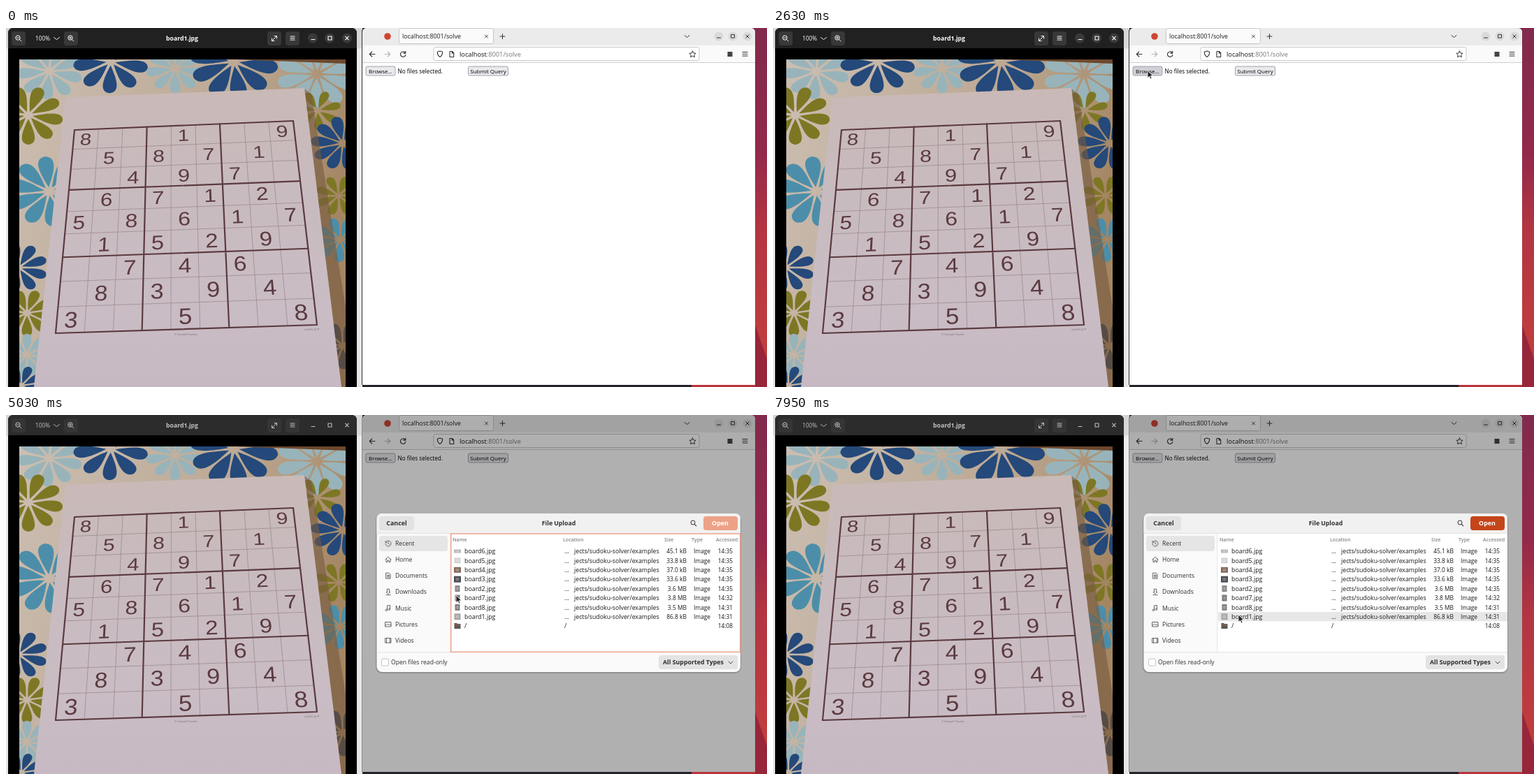
Recreate the animation shown at these times as an HTML page. Size 1089x514 px, loop 8 s.

```html
<!DOCTYPE html>
<html lang="en">
<head>
<meta charset="utf-8">
<title>Sudoku upload</title>
<style>
html, body { margin: 0; width: 100%; height: 100%; overflow: hidden; background: #000; }
svg { display: block; width: 100vw; height: 100vh; }
text { font-family: "Open Sans", "Noto Sans", sans-serif; white-space: pre; }
.digit { font-family: "Liberation Sans", Arial, sans-serif; }
</style>
</head>
<body>
<svg id="stage" viewBox="0 0 1089 514" xmlns="http://www.w3.org/2000/svg"></svg>
<script>
const LOOP = 8000;

// Markup helpers
const rect = (x, y, w, h, fill, extra = '') =>
  `<rect x="${x}" y="${y}" width="${w}" height="${h}" fill="${fill}" ${extra}/>`;
const circle = (x, y, r, fill, extra = '') =>
  `<circle cx="${x}" cy="${y}" r="${r}" fill="${fill}" ${extra}/>`;
const poly = (pts, fill, extra = '') => `<polygon points="${pts}" fill="${fill}" ${extra}/>`;
const line = (d, color = '#333', w = 1.1, extra = '') =>
  `<path d="${d}" fill="none" stroke="${color}" stroke-width="${w}" stroke-linecap="round" stroke-linejoin="round" ${extra}/>`;
const text = (s, x, y, size, fill = '#222', extra = '') =>
  `<text x="${x}" y="${y}" font-size="${size}" fill="${fill}" ${extra}>${s}</text>`;
const BOLD = 'font-weight="700"', MID = 'text-anchor="middle"', END = 'text-anchor="end"';
const gradient = (id, stops, dir = 'x2="0" y2="1"') =>
  `<linearGradient id="${id}" ${dir}>` +
  stops.map(([o, c]) => `<stop offset="${o}" stop-color="${c}"/>`).join('') + '</linearGradient>';

// Maps the unit square onto four corners in perspective
function projector([x0, y0], [x1, y1], [x2, y2], [x3, y3]) {
  const ax = x1 - x2, ay = y1 - y2, bx = x3 - x2, by = y3 - y2;
  const sx = x0 - x1 + x2 - x3, sy = y0 - y1 + y2 - y3, det = ax * by - bx * ay;
  const g = (sx * by - bx * sy) / det, h = (ax * sy - sx * ay) / det;
  return (u, v) => {
    const w = g * u + h * v + 1;
    return [((x1 - x0 + g * x1) * u + (x3 - x0 + h * x3) * v + x0) / w,
            ((y1 - y0 + g * y1) * u + (y3 - y0 + h * y3) * v + y0) / w].map(n => +n.toFixed(2));
  };
}

function flower(x, y, r, n, color, turn = 0) {
  const petal = `M${r * .12} 0C${r * .45} ${-r * .13} ${r * .95} ${-r * .34} ${r} 0C${r * .95} ${r * .34} ${r * .45} ${r * .13} ${r * .12} 0`;
  let s = `<g transform="translate(${x} ${y}) scale(1 .84)" fill="${color}">`;
  for (let i = 0; i < n; i++) s += `<path transform="rotate(${turn + i * 360 / n})" d="${petal}"/>`;
  return s + '</g>';
}

function sudoku() {
  const at = projector([98, 146], [411, 133], [445, 425], [71, 437]);
  const ink = '#5b3a40';
  let s = '';
  for (const thick of [false, true])
    for (let i = 0; i <= 9; i++) {
      if ((i % 3 === 0) !== thick) continue;
      const k = i / 9;
      s += line(`M${at(k, 0)}L${at(k, 1)}M${at(0, k)}L${at(1, k)}`, thick ? ink : '#9c8b90', thick ? 2.2 : .8);
    }
  const rows = ['8...1...9', '.5.8.7.1.', '..4.9.7..', '.6.7.1.2.', '5.8.6.1.7',
                '.1.5.2.9.', '..7.4.6..', '.8.3.9.4.', '3...5...8'];
  rows.forEach((row, r) => [...row].forEach((d, c) => {
    if (d === '.') return;
    // Each digit lies in the plane of its cell
    const p = (u, v) => at((c + u) / 9, (r + v) / 9);
    const [x, y] = p(.5, .5), west = p(0, .5), east = p(1, .5), north = p(.5, 0), south = p(.5, 1);
    const axis = (a, b) => `${(b[0] - a[0]) / 100} ${(b[1] - a[1]) / 100}`;
    s += text(d, 0, 31, 85, ink, `class="digit" ${MID} transform="matrix(${axis(west, east)} ${axis(north, south)} ${x} ${y})"`);
  }));
  return s + text('© Sample Puzzles', 241, 439.5, 4, '#7c6a74') +
    text('sudoku grid', 427, 433, 3.8, '#7c6a74', 'transform="rotate(-2 427 433)"');
}

function photo() {
  const blue = '#24497a', teal = '#4c8ea9', pale = '#98b4ba', olive = '#7d7724';
  return '<g clip-path="url(#photoClip)">' +
    rect(19, 45, 467, 469, 'url(#cloth)') +
    flower(62, 62, 48, 9, pale, 15) + flower(242, 58, 42, 9, pale, 10) +
    flower(445, 66, 58, 10, pale, 20) +
    flower(150, 48, 54, 9, blue, 12) + flower(326, 48, 64, 10, blue, 10) +
    flower(32, 125, 50, 9, olive, 10) + flower(446, 118, 34, 7, olive, 35) +
    flower(482, 165, 46, 10, blue, 5) +
    flower(62, 234, 60, 10, teal, 12) +
    flower(18, 343, 42, 9, blue, 20) +
    flower(30, 408, 40, 9, olive, 10) + flower(30, 468, 36, 9, pale, 30) +
    flower(22, 512, 34, 9, blue, 10) +
    flower(476, 240, 34, 8, olive, 20) + flower(478, 303, 38, 9, teal, 12) +
    flower(482, 455, 40, 9, '#26384f', 8) +
    poly('330,45 486,45 486,51', '#6d482d') +
    poly('427,87 437,95 486,400 486,514 480,514', '#775a40', 'opacity=".6"') +
    poly('85,99.500 427,86 480,514 40,514', 'url(#paper)') +
    sudoku() + '</g>';
}

function viewer() {
  const ctl = [439, 463, 488];
  return rect(0, 0, 510, 514, 'url(#gap)') +
    '<path d="M3 514V8Q3 0 11 0H494Q502 0 502 8V514Z" fill="#000"/>' +
    '<path id="head" d="M3 29V8Q3 0 11 0H494Q502 0 502 8V29Z"/>' +
    '<g id="pills">' + [8, 83, 374, 400].map(x => rect(x, 5, 20, 20, '#fff', 'rx="4"')).join('') + '</g>' +
    '<g id="rounds">' + ctl.map(x => circle(x, 14.5, 7, '#393939')).join('') + '</g>' +
    '<g id="headText">' +
    text('100%', 42, 17.8, 8.3, '#fff') + text('board1.jpg', 252, 17.6, 8.7, '#fff', `${BOLD} ${MID}`) +
    [17.5, 92.5].map((x, i) => circle(x - .5, 14, 3.2, 'none', 'stroke="#fff"') +
      line(`M${x + 2} 16.500l2.500 2.500M${x - 2} 14h3${i ? `M${x - .5} 12.500v3` : ''}`, '#fff', .9)).join('') +
    line('M68.500 13.500l4 3 4-3', '#fff', .9) +
    line('M381 18l6-6M384 11.500h3.500v3.500M380.500 15v3.500h3.500', '#fff', 1) +
    line('M407 12h6M407 14.500h6M407 17h6', '#fff', 1.1) +
    line('M437 16.500h5M461 12h5v5h-5zM485.700 12.200l4.600 4.600M490.300 12.200l-4.600 4.600', '#fff', 1.1) +
    '</g>' + photo();
}

function button(x, w, label, id = '') {
  return rect(x, 55, w, 13, '#e9e9ed', `rx="2" stroke="#8f8f9d" stroke-width=".8" ${id}`) +
    text(label, x + w / 2, 64.6, 8, '#000', MID);
}

function browser() {
  const ctl = [1020, 1040, 1061];
  return '<g clip-path="url(#winClip)">' +
    rect(510, 0, 562, 511, '#fff') + rect(510, 0, 562, 25, '#ebebeb') +
    rect(562.5, .5, 135, 22, '#fbfbfb', 'rx="3" stroke="#bcbcbc" stroke-width=".8"') +
    rect(510, 25, 562, 24.5, '#fafafa') + rect(510, 49, 562, 1, '#cfcfcf') +
    circle(546, 12, 4.8, '#cf4433') +
    text('localhost:8001/solve', 567, 15, 8.85, '#1c1c1c') +
    line('M685.500 10l4 4M689.500 10l-4 4', '#333', .9) +
    line('M707 12h7M710.500 8.500v7', '#333', 1) + line('M971 10.500l3.500 3 3.500-3', '#333', 1) +
    ctl.map(x => circle(x, 12, 6.5, '#dadada')).join('') +
    line('M1017.500 14h5M1038 9.500h4.500v4.500h-4.500zM1058.800 9.800l4.400 4.400M1063.200 9.800l-4.400 4.400', '#333', 1) +
    line('M528 37.500h-7.500M523.800 34l-3.500 3.500 3.500 3.500') +
    line('M542 37.500h7.500M546.200 34l3.500 3.500-3.500 3.500', '#b5b5b5') +
    line('M571 35.200a3.700 3.700 0 1 0 .8 3.300M571.800 33.200v2.900h-2.900') +
    rect(612, 27.5, 380, 19, '#fff', 'rx="2.500" stroke="#bdbdbd" stroke-width=".8"') +
    line('M621 33l3.700 1.300q0 5-3.700 7.200q-3.700-2.200-3.700-7.200z') +
    line('M635 33.500h3.500l2.200 2.200v5.800h-5.700zM638.300 33.500v2.400h2.400') +
    text('localhost<tspan fill="#777">:8001/solve</tspan>', 649, 40.6, 9.25, '#111') +
    line('M982.500 33l1.400 2.900 3.200.4-2.300 2.200.6 3.200-2.900-1.600-2.900 1.600.6-3.200-2.300-2.200 3.200-.4z', '#333', 1) +
    rect(1032.5, 34, 7, 7, '#444') +
    line('M1054 34.500h7M1054 37.200h7M1054 40h7', '#333', 1.1) +
    button(515, 42, 'Browse…', 'id="browse"') +
    text('No files selected.', 560.5, 64.6, 8.2, '#000') + button(661.5, 57, 'Submit Query') +
    rect(510, 0, 562, 511, '#000', 'id="dim" fill-opacity=".310"') + '</g>';
}

const PLACES = ['Recent', 'Home', 'Documents', 'Downloads', 'Music', 'Pictures', 'Videos'];
const ICONS = [
  'M-4 0a4 4 0 1 0 1-2.600M-4-3.500v2h2M0-2v2.200l1.500 1', 'M-4 0l4-4 4 4M-3-1v4.500h2v-2.500h2v2.500h2v-4.500',
  'M-3-4h4l2 2v6h-6zM-1.500-1h3M-1.500.500h3M-1.500 2h3', 'M-1.500-4h3v4h1.500l-3 3-3-3h1.500zM-3 4.300h6',
  'M-1.500 3v-6.500l4-.500v6M-1.500 3a1.300 1.300 0 1 1-.1-.5M2.500 2a1.300 1.300 0 1 1-.1-.5',
  'M-4-3h8v6.500h-8zM-4 2l2.500-2.500 2 2 1.500-1.500 2 2', 'M-4-3h8v6.500h-8zM-2.500-3v6.500M2.500-3v6.500'];
const FILES = [
  [6, '45.1 kB', '14:35', 10, 5, '#b9b9b9'], [5, '33.8 kB', '14:35', 9, 8, '#d3d3d3'],
  [4, '37.0 kB', '14:35', 10, 8, '#84685a'], [3, '33.6 kB', '14:35', 10, 9, '#4a4d55'],
  [2, '3.6 MB', '14:35', 7, 9, '#858585'], [7, '3.8 MB', '14:32', 7, 9, '#777'],
  [8, '3.5 MB', '14:31', 7, 9, '#7e7e7e'], [1, '86.8 kB', '14:31', 9, 9, '#aaa5a3']];

function dialog() {
  const dark = '#2e2e2e', black = '#1a1a1a';
  let s = '<g id="dialog">' +
    rect(529, 141, 523, 229, '#000', 'rx="9" opacity=".180"') +
    rect(530.5, 141, 520.5, 227, '#fafafa', 'rx="8"') +
    '<path d="M530.500 169V149q0-8 8-8H1043q8 0 8 8V169Z" fill="#f1f1f1"/>' +
    rect(534, 145, 50, 20, '#e2e2e2', 'rx="4"') + text('Cancel', 559, 158, 8.9, dark, `${BOLD} ${MID}`) +
    text('File Upload', 791, 158, 8.7, dark, `${BOLD} ${MID}`) +
    circle(983, 154, 3, 'none', 'stroke="#333"') + line('M985.300 156.300l2.500 2.500') +
    rect(998, 145, 49, 20, '#eda288', 'rx="4" id="open"') +
    text('Open', 1022, 158, 8.9, '#fff', `${BOLD} ${MID}`) +
    rect(534, 173, 98, 22, '#e5e5e5', 'rx="4"');
  PLACES.forEach((name, i) => {
    const y = 184 + i * 23.1;
    s += text(name, 557, y + 3.1, 8.6, dark) +
      line(ICONS[i], '#555', .9, `transform="translate(547 ${y})"`);
  });
  s += rect(636, 169.5, 415, 170, '#fff') + rect(530.5, 169, 520.5, .8, '#dedede') +
    rect(530.5, 339.5, 520.5, .8, '#dedede') + rect(635.5, 169, .8, 171, '#dedede');
  [['Name', 639], ['Location', 797], ['Size', 942], ['Type', 981], ['Accessed', 1016]].forEach(([h, x]) =>
    s += text(h, x, 181, 7.1, '#858585', 'font-weight="600"'));
  s += rect(637, 282, 414, 13.3, '#e7e7e7', 'id="row"');
  FILES.forEach(([n, size, time, w, h, color], i) => {
    const y = 195 + i * 13.4, base = y + 3.1;
    s += rect(646 - w / 2, y - h / 2, w, h, color) +
      rect(646 - w / 4, y - h / 4, w / 2, h / 2, '#fff', 'opacity=".250"') +
      text(`board${n}.jpg`, 656, base, 8.85, black) +
      text('…', 799, base, 8.8, black) + text('jects/sudoku-solver/examples', 813, base, 8.78, black) +
      text(size, 974, base, 8.45, black, END) + text('Image', 984, base, 8.4, black) +
      text(time, 1040, base, 8.3, black, END);
  });
  return s + '<path d="M641.500 298h3.500l1 1h4.500v7h-9z" fill="#5b5754"/>' + rect(642, 300, 8, .8, '#b06a50') +
    text('/', 656, 305.3, 8.8, black) + text('/', 799, 305.3, 8.8, black) +
    text('14:08', 1040, 305.3, 8.3, black, END) +
    rect(636.8, 170, 413.8, 169.2, 'none', 'id="focus" stroke="#f2a78f" stroke-width="1.500"') +
    rect(632, 174, 2, 118, '#999', 'rx="1" id="bar"') +
    rect(537.5, 349, 10, 10, '#fff', 'rx="2" stroke="#c3c3c3"') +
    text('Open files read-only', 551, 357.2, 8.6, dark) +
    rect(934, 344, 113, 20, '#e3e3e3', 'rx="4"') +
    text('All Supported Types', 940, 357.2, 8.8, dark, BOLD) +
    line('M1034 353l3 3 3-3', '#444', 1) + '</g>';
}

const stage = document.getElementById('stage');
stage.innerHTML = '<defs>' +
  gradient('cloth', [[0, '#cbbeb2'], [.6, '#bda994'], [1, '#a48663']], 'x2="1" y2=".350"') +
  gradient('paper', [[0, '#c9b9b7'], [.35, '#c8bbbf'], [.75, '#c9bcc4'], [1, '#c7b9c3']]) +
  gradient('gap', [[0, '#d5d5d5'], [.055, '#d9d9d9'], [.06, '#ececec'], [1, '#e6e6e6']]) +
  gradient('wall', [[0, '#812a4d'], [.35, '#93294a'], [.55, '#b23542'], [1, '#c5403c']]) +
  '<clipPath id="photoClip"><rect x="19" y="45" width="467" height="469"/></clipPath>' +
  '<clipPath id="winClip"><path d="M510 511V7q0-7 7-7H1065q7 0 7 7V511Z"/></clipPath></defs>' +
  rect(0, 0, 1089, 514, '#25222c') + rect(1060, 0, 29, 514, 'url(#wall)') +
  poly('1072,425 1089,474 1089,514 1072,514', '#97263a') + rect(981, 511, 91, 3, '#b8343a') +
  viewer() + rect(509, 3, 1.2, 508, '#333', 'id="edge"') + browser() + dialog() +
  circle(0, 0, 9, '#777', 'id="press" fill-opacity=".280"') +
  '<path id="cursor" d="M0 0V10.500L2.500 8.300L4.200 12L6 11.200L4.400 7.600H7.800Z" fill="#222" stroke="#fff" stroke-width=".8" stroke-linejoin="round"/>';

const el = {};
for (const id of ['head', 'pills', 'rounds', 'headText', 'edge', 'browse', 'dim', 'dialog', 'open', 'row', 'focus', 'bar', 'press', 'cursor'])
  el[id] = document.getElementById(id);
const set = (id, name, value) => el[id].setAttribute(name, value);
const show = (id, on) => set(id, 'opacity', +on);
const mix = (a, b, k) => `rgb(${a.map((v, i) => Math.round(v + (b[i] - v) * k))})`;

// start, end, steps, from x y, to x y, ease-out powers in x and y
const MOVES = [
  [920, 1330, 7, 1124.6, 605, 628, 137, 2, 2],
  [1610, 2230, 10, 628, 137, 536, 61, 2.65, 3.35],
  [4640, 5380, 12, 536, 61, 663, 280, 2.17, 2.63],
  [5450, 5730, 5, 663, 280, 666, 286, 1, 1]];

function pointer(t) {
  const move = MOVES.filter(m => t >= m[0]).pop();
  if (!move) return [-50, -50];
  const [t0, t1, n, x0, y0, x1, y1, px, py] = move;
  const step = Math.min(n, 1 + Math.floor((t - t0) / (t1 - t0) * (n - 1) + .25));
  const left = 1 - step / n;
  return [x1 + (x0 - x1) * left ** px, y1 + (y0 - y1) * left ** py];
}

// Fraction of the listed moments already passed
const passed = (t, ...times) => times.filter(m => t >= m).length / times.length;

function draw(t) {
  const [x, y] = pointer(t);
  const at = `translate(${x.toFixed(1)} ${y.toFixed(1)})`;
  set('cursor', 'transform', at);
  set('press', 'transform', at);
  show('press', (t >= 2430 && t < 2630) || (t >= 6010 && t < 6210));
  set('browse', 'fill', x > 515 && x < 557 && y > 55 && y < 68 ? '#d0d0d7' : '#e9e9ed');

  const away = passed(t, 3360, 3490);
  set('head', 'fill', mix([33, 33, 33], [44, 44, 44], away));
  set('pills', 'opacity', .1 - .06 * away);
  set('rounds', 'opacity', 1 - away);
  set('headText', 'opacity', 1 - .15 * away - .15 * passed(t, 3690));
  set('edge', 'fill', t < 2770 ? '#333' : '#8a8a8a');

  show('dim', t >= 3960);
  show('dialog', t >= 3960);
  const chosen = passed(t, 6410, 6540, 6670);
  show('row', chosen > 0);
  set('open', 'fill', t < 7950 ? mix([237, 162, 136], [233, 84, 32], chosen) : '#c4451a');
  set('focus', 'opacity', 1 - passed(t, 6870, 6940));
  set('bar', 'opacity', t < 6540 ? 0 : 1 - passed(t, 7410, 7810));
}

const begin = performance.now();
function tick() {
  draw((performance.now() - begin) % LOOP);
  requestAnimationFrame(tick);
}
tick();
</script>
</body>
</html>
```
